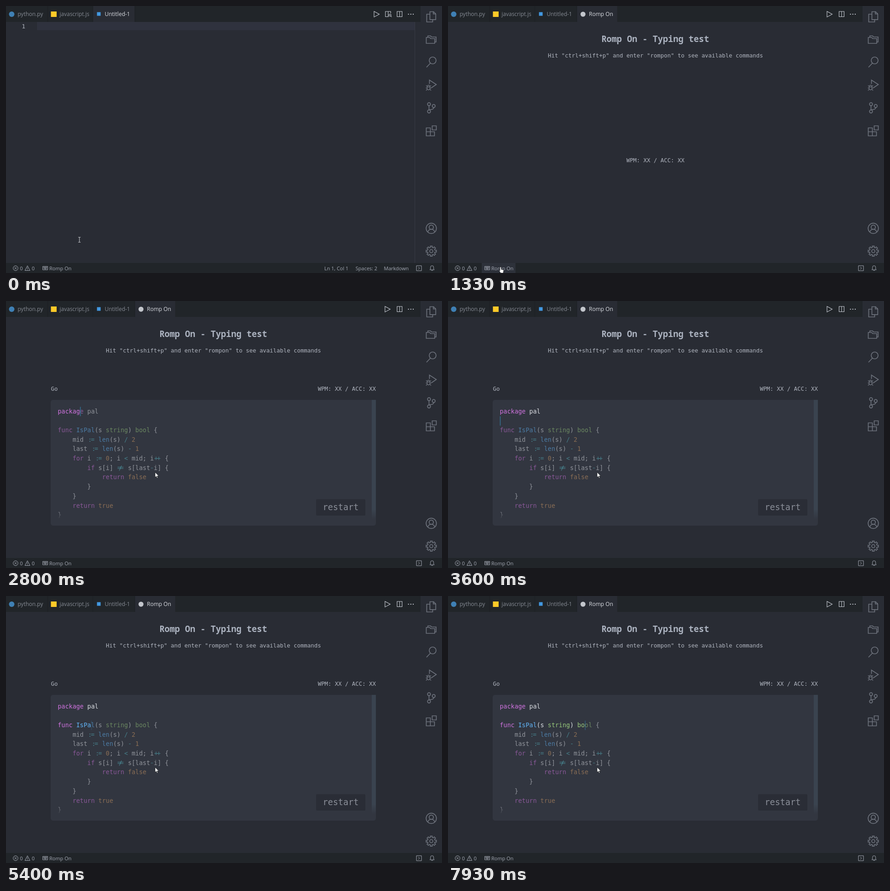
Recreate the animation shown at these times as an HTML page. Size 956 by 586 pixels, loop 8 s.

```html
<!DOCTYPE html>
<html lang="en">
<head>
<meta charset="utf-8">
<title>Typing test in an editor</title>
<style>
  html, body { margin: 0; width: 100%; height: 100%; overflow: hidden; background: #292c34; }
  svg { display: block; }
  text { font: 12px "Open Sans", sans-serif; fill: #a4a9b4; white-space: pre; }
  .tab { fill: #858a93; }
  .on { fill: #d9dce2; }
  #status text { font-size: 11px; }
  .mono text { font: 12.45px "DejaVu Sans Mono", monospace; fill: #b0b5bf; }
  .mono .title { font: 600 18.75px "Noto Sans Mono", monospace; fill: #abb2bf; }
  .mono .button { font-size: 18.7px; fill: #8a8e98; }
  #code text { font-size: 13.45px; }
  .line { fill: none; stroke: #6d727c; stroke-width: 1.7; }
  .thin { fill: none; stroke: #a4a9b4; stroke-width: 1; }
  .bright { stroke: #c8ccd4; stroke-width: 1.1; }
  .mid { text-anchor: middle; }
</style>
</head>
<body>
<svg width="956" height="586" viewBox="0 0 956 586">
  <defs>
    <linearGradient id="fade" x2="0" y2="1">
      <stop stop-color="#323640" stop-opacity="0"/>
      <stop offset="1" stop-color="#323640"/>
    </linearGradient>
  </defs>
  <rect width="956" height="586" fill="#292c34"/>

  <!-- tabs -->
  <rect width="909" height="35" fill="#212529"/>
  <path d="M91.5 0v35M190.5 0v35M282.5 0v35" stroke="#1b1e22"/>
  <rect id="activeTab" y="0" height="35" fill="#292c34"/>
  <circle cx="12.5" cy="18" r="6" fill="#3f80b4"/>
  <rect x="98.5" y="12" width="12.5" height="12" fill="#ffca28"/>
  <rect x="199.5" y="13.5" width="8" height="8" fill="#4298e0"/>
  <text class="tab" x="25.5" y="22">python.py</text>
  <text class="tab" x="117.5" y="22">javascript.js</text>
  <text id="docTab" x="216.5" y="22">Untitled-1</text>
  <g id="testTab">
    <circle cx="296" cy="18" r="5.5" fill="#c3c6cc"/>
    <text class="on" x="309" y="22">Romp On</text>
  </g>
  <g class="thin bright">
    <path id="play" d="M1 11.8l11.5 6.2L1 24.2z"/>
    <path d="M857.5 12h11v11.5h-11zM863 12v11.5"/>
    <g id="preview">
      <path d="M839 23.5h-7V12h11.5v4M838 12v11.5"/>
      <circle cx="842" cy="20" r="2.2"/><path d="M843.5 21.8l2 2.4"/>
    </g>
    <path d="M881.5 18h2m3.2 0h2m3.2 0h2" stroke-width="2"/>
  </g>

  <!-- side bar -->
  <g class="line">
    <path d="M929.5 12.5h8l4.8 4.8v12.5h-12.8zM937 12.5v5h5M929 18h-6.5v17h13v-5"/>
    <path d="M921.5 69v13h18.5v-10.5h-9l-2-2.5zM925 69v-3.5h6l2 2.5h10v11h-3"/>
    <circle cx="935.5" cy="119.5" r="7.5"/><path d="M930.5 125.5l-8.5 9"/>
    <path d="M928.5 171v-8.5l15 9.7-11 7.5"/>
    <path d="M923.5 177a3 3 0 0 1 6 0v4a3 3 0 0 1-6 0zM923.5 177.5h6M921 174.5l2.5 2m8.5-2l-2.5 2M920.5 180h3m6 0h3M921 185.5l2.5-3m8.5 3l-2.5-3" stroke-width="1.3"/>
    <circle cx="927.5" cy="215.5" r="3.3"/><circle cx="937.8" cy="219.5" r="3.3"/><circle cx="927.5" cy="231.5" r="3.3"/>
    <path d="M927.5 219v9M937.8 223c0 4-5 4.5-9 4.7"/>
    <path d="M921.5 267.5h9v17.5h-9zM921.5 276h18v9h-9M934.5 263h9v9h-9z"/>
    <circle cx="932.5" cy="488" r="11.3"/><circle cx="932.5" cy="485.5" r="4.7"/><path d="M925 496.5c1-8.5 14-8.5 15 0"/>
    <path id="gear"/><circle cx="932.5" cy="538" r="3.5"/>
  </g>

  <!-- plain document -->
  <g id="doc" class="mono">
    <rect x="68" y="35" width="828" height="18" fill="#2f323e"/>
    <path d="M896.5 35v529" stroke="#373b44"/>
    <text x="34.5" y="49" style="font-size:13px">1</text>
  </g>

  <!-- typing test -->
  <g id="page" class="mono">
    <text class="title mid" x="454.5" y="79">Romp On - Typing test</text>
    <text class="mid" x="454.8" y="113">Hit "ctrl+shift+p" and enter "rompon" to see available commands</text>
    <text id="score" class="mid">WPM: XX / ACC: XX</text>
    <g id="panel">
      <text x="98.5" y="197">Go</text>
      <rect x="98" y="217" width="713" height="276" rx="5" fill="#323640"/>
      <rect x="802" y="217" width="9" height="262" fill="#3a434f"/>
      <g id="code"></g>
      <rect id="caret" width="1.5" height="20.5" fill="#38a0d8"/>
      <rect x="99" y="457" width="712" height="22" fill="url(#fade)"/>
      <rect x="680" y="435" width="108" height="36" rx="2" fill="#2a2d36"/>
      <text class="button mid" x="734" y="459">restart</text>
    </g>
  </g>

  <!-- status bar -->
  <g id="status">
    <rect y="564" width="956" height="22" fill="#212529"/>
    <rect id="hover" x="74" y="564" width="74" height="22" fill="#2d313a"/>
    <g class="thin">
      <circle cx="21" cy="575.5" r="5.3"/><path d="M18.7 573.2l4.6 4.6m0-4.6l-4.6 4.6"/>
      <path d="M47 570l5.5 10.5h-11zM47 573.5v3.5m0 1v1.3"/>
      <path d="M80.5 571.5h11v7.5h-11zM82 573.5h8m-8 1.8h8m-6.5 1.8h5"/>
      <path d="M900 570h11v11h-11zM904 572.8l3 2.7-3 2.7"/>
      <path d="M929.5 579h9.5l-1.3-2v-3.5a3.5 3.5 0 0 0-7 0v3.5zM933 580.5h2.5"/>
    </g>
    <text x="30.5" y="580">0</text>
    <text x="56.5" y="580">0</text>
    <text x="95" y="580">Romp On</text>
    <g id="docInfo">
      <text x="698" y="580">Ln 1, Col 1</text>
      <text x="766.5" y="580">Spaces: 2</text>
      <text x="828.5" y="580">Markdown</text>
    </g>
  </g>

  <g id="mouse">
    <path id="beam" d="M-2.5-5.5h2q.5 0 .5.5 0-.5.5-.5h2M0-5V5M-2.5 5.5h2q.5 0 .5-.5 0 .5.5.5h2" fill="none" stroke="#d8dade"/>
    <path id="hand" transform="scale(1.08)" d="M3 .6c1 0 1.3.6 1.3 1.3v3.6l4 .9c.9.3 1.2.9 1 1.9l-.7 4.7H3.2L.3 8.7c.3-1 1.2-.9 1.5-.4V1.9C1.8 1.2 2.2.6 3 .6z" fill="#fff" stroke="#15171b" stroke-width=".8"/>
    <path id="arrow" d="M0 0v11l2.6-2.4 1.7 4 1.7-.7-1.7-3.8h3.5z" fill="#fff" stroke="#15171b" stroke-width=".7"/>
  </g>
</svg>
<script>
const $ = id => document.getElementById(id);
const LOOP = 8000, CHAR = 8.1, ROW = 20.67, LEFT = 113.5;

const source = `package pal

func IsPal(s string) bool {
    mid := len(s) / 2
    last := len(s) - 1
    for i := 0; i < mid; i++ {
        if s[i] != s[last-i] {
            return false
        }
    }
    return true
}`;
const rules = [
  [/^(package|func|for|if|return)$/, '#d073df'],
  [/^(IsPal|len)$/, '#61b4f7'],
  [/^(string|bool)$/, '#98c97b'],
  [/^(\d|true|false)$/, '#d19a66'],
  [/^(:=|!=|\+\+|[<\/-])$/, '#56b6c2'],
  [/./, '#dcdfe4'],
];
// Joined operators: glyphs with their offsets
const ligatures = {
  ':=': [[':', 1.8], ['=', 7.7]],
  '++': [['+', 1], ['+', 7]],
  '!=': [['=', 1], ['=', 7], ['/', 4]],
};

const glyphs = [];
for (const { 0: token, index } of source.matchAll(/\w+|:=|!=|\+\+|[^\w\s]/g)) {
  const { row, col } = place(index);
  const color = rules.find(([pattern]) => pattern.test(token))[1];
  const parts = ligatures[token] || [...token].map((c, i) => [c, i * CHAR]);
  parts.forEach(([char, dx], i) => {
    const el = document.createElementNS('http://www.w3.org/2000/svg', 'text');
    el.textContent = char;
    el.setAttribute('x', LEFT + col * CHAR + dx);
    el.setAttribute('y', 246.8 + row * ROW);
    el.style.fill = color;
    $('code').append(el);
    glyphs.push({ el, index: index + i });
  });
}

function place(index) {
  const lines = source.slice(0, index).split('\n');
  return { row: lines.length - 1, col: lines.at(-1).length };
}

const keyTimes = [
  2270, 2400, 2530, 2600, 2730, 2800, 2870, 3000, 3070, 3070, 3130, 3530, 3870,
  4070, 4200, 4270, 4400, 4530, 4670, 4800, 5200, 5330, 5670, 6000, 6400,
  6730, 6870, 7070, 7130, 7200, 7330, 7400, 7600, 7730, 7870, 7930,
];
// Pointer moves: start, end, x, y
const moves = [[70, 670, 109, 575], [870, 1130, 112, 572], [1370, 2060, 327, 376]];

const tooth = [[-0.24, 8.4], [-0.18, 11.4], [0.18, 11.4], [0.24, 8.4]];
const gear = Array.from({ length: 8 }, (_, i) => tooth.map(([turn, r]) => {
  const angle = i * Math.PI / 4 + turn;
  return `${932.5 + r * Math.sin(angle)} ${538 - r * Math.cos(angle)}`;
}));
$('gear').setAttribute('d', `M${gear.flat().join('L')}z`);

const show = (id, on) => $(id).style.display = on ? '' : 'none';
const set = (id, attrs) => {
  for (const name in attrs) $(id).setAttribute(name, attrs[name]);
};

function pointer(t) {
  let x = 161, y = 512.5;
  for (const [start, end, toX, toY] of moves) {
    const p = Math.min(1, Math.max(0, (t - start) / (end - start)));
    const eased = p * p * (3 - 2 * p);
    x += (toX - x) * eased;
    y += (toY - y) * eased;
  }
  return { x, y };
}

function draw(t) {
  const opened = t >= 930, ready = t >= 1400;
  show('doc', !opened);
  show('docInfo', !opened);
  show('preview', !opened);
  show('testTab', opened);
  show('page', t >= 1330);
  show('panel', ready);
  set('activeTab', opened ? { x: 283, width: 88 } : { x: 191, width: 91 });
  set('docTab', { class: opened ? 'tab' : 'on' });
  set('play', { transform: `translate(${opened ? 830 : 806})` });
  set('score', ready ? { x: 747.3, y: 197 } : { x: 454.8, y: 343 });

  const typed = keyTimes.filter(time => time <= t).length;
  for (const { el, index } of glyphs) el.style.opacity = index < typed ? 1 : 0.55;
  const { row, col } = place(typed);
  set('caret', {
    x: 113.8 + col * CHAR,
    y: 232.3 + row * ROW,
    opacity: 0.55 - 0.35 * Math.cos((t - 5400) / 400 * Math.PI),
  });

  const { x, y } = pointer(t), over = y > 564;
  set('mouse', { transform: `translate(${Math.round(x)} ${Math.round(y)})` });
  show('hover', over);
  show('hand', over);
  show('beam', !over && !opened);
  show('arrow', !over && opened);
}

const begin = performance.now();
(function tick() {
  draw((performance.now() - begin) % LOOP);
  requestAnimationFrame(tick);
})();
</script>
</body>
</html>
```
